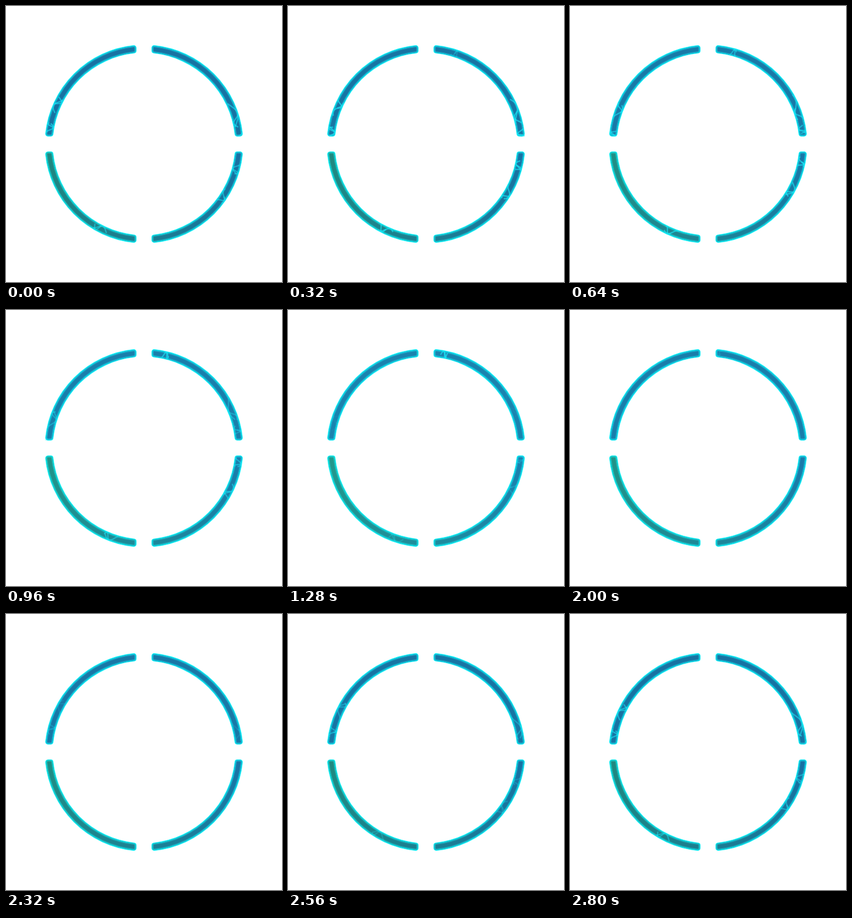
An HTML page with a canvas for the animation above (2880 ms loop, 500x500 px).

```html
<!DOCTYPE html>
<html lang="en">
<head>
<meta charset="utf-8">
<title>Energy ring</title>
<style>
  html, body { margin: 0; width: 100%; height: 100%; overflow: hidden; background: #fff; }
  canvas { display: block; width: 500px; height: 500px; }
</style>
</head>
<body>
<canvas id="stage" width="500" height="500"></canvas>
<script>
const ctx = document.getElementById('stage').getContext('2d');
const LOOP = 2880, STEP = 80, MID = 172.5, DRIFT = -7, LIFE = 1000;
const rad = deg => deg * Math.PI / 180;
const mix = (a, b, k) => a + (b - a) * k;

// Four ring segments whose ends are cut parallel to the axes.
function ring(half, gap) {
  const outer = MID + half, inner = MID - half;
  const a = Math.asin(gap / outer), b = Math.asin(gap / inner);
  const quarter = new Path2D(), all = new Path2D();
  quarter.arc(0, 0, outer, a, Math.PI / 2 - a);
  quarter.arc(0, 0, inner, Math.PI / 2 - b, b, true);
  quarter.closePath();
  for (let i = 0; i < 4; i++) all.addPath(quarter, new DOMMatrix().rotate(90 * i));
  return all;
}

const core = ring(2.6, 18.4);
const edge = ring(7.2, 13.8);

const sparks = [
  { angle: -20, peak: 320, length: 16 },
  { angle: -6, peak: 240, length: 5 },
  { angle: 12, peak: 480, length: 6 },
  { angle: 30, peak: 480, length: 9 },
  { angle: 202, peak: 320, length: 10 },
  { angle: 188, peak: 240, length: 6 },
  { angle: 114, peak: 480, length: 9 },
  { angle: -78, peak: 1120, length: 4 }
];

// A winding thread along the ring, drawn as a soft glow and a bright line.
function strand(angle, length, phase) {
  const alpha = ctx.globalAlpha;
  ctx.beginPath();
  for (let k = 0; k <= 1; k += 0.05) {
    const a = rad(angle + (k - 0.5) * length);
    const r = MID + 6 * Math.sin(k * 5 + phase);
    ctx.lineTo(r * Math.cos(a), r * Math.sin(a));
  }
  for (const [width, share] of [[3.5, 0.3], [1.4, 1]]) {
    ctx.lineWidth = width;
    ctx.globalAlpha = alpha * share;
    ctx.stroke();
  }
  ctx.globalAlpha = alpha;
}

function drawSpark({ angle, peak, length }, i, t) {
  const d = (t - peak + LOOP * 1.5) % LOOP - LOOP / 2;
  if (Math.abs(d) >= LIFE) return;
  ctx.globalAlpha = 0.75 * Math.cos(d / LIFE * Math.PI / 2);
  const at = angle + DRIFT * d / 1000;
  const phase = i * 1.7 + d / 400;
  strand(at, length, phase);
  strand(at + length / 4, length / 2, phase + 2.5);
}

// Blue over the top, turning from blue to green along the bottom.
function coreFill(glow) {
  const fill = ctx.createConicGradient(0, 0, 0);
  const add = (at, r, g, b) =>
    fill.addColorStop(at, `rgb(${r + 3 * glow}, ${g + 16 * glow}, ${b + 12 * glow})`);
  add(0, 24, 110, 164);
  add(0.25, 28, 124, 144);
  add(0.5, 32, 136, 126);
  add(0.5, 24, 114, 162);
  add(1, 24, 114, 162);
  return fill;
}

function draw(t) {
  ctx.setTransform(1, 0, 0, 1, 0, 0);
  ctx.globalAlpha = 1;
  ctx.fillStyle = '#fff';
  ctx.fillRect(0, 0, 500, 500);
  ctx.translate(250, 250);
  ctx.lineJoin = 'round';

  const fill = coreFill(0.5 - 0.5 * Math.cos(2 * Math.PI * t / LOOP));
  ctx.fillStyle = ctx.strokeStyle = fill;
  ctx.fill(core);
  // The rim fades inwards from bright cyan to the core colour.
  for (let k = 0; k <= 1; k += 0.25) {
    ctx.lineWidth = mix(9.6, 1.6, k);
    ctx.globalAlpha = 1;
    ctx.strokeStyle = fill;
    if (k > 0) ctx.stroke(core);
    ctx.globalAlpha = 1 - k;
    ctx.strokeStyle = '#10faff';
    ctx.stroke(core);
  }
  ctx.globalAlpha = 1;
  ctx.fill(core);

  ctx.save();
  ctx.clip(edge);
  ctx.strokeStyle = '#18e6f6';
  sparks.forEach((s, i) => drawSpark(s, i, t));
  ctx.restore();
}

const start = performance.now();
function tick() {
  const t = (performance.now() - start) % LOOP;
  draw(Math.floor(t / STEP) * STEP);
  requestAnimationFrame(tick);
}
tick();
</script>
</body>
</html>
```
